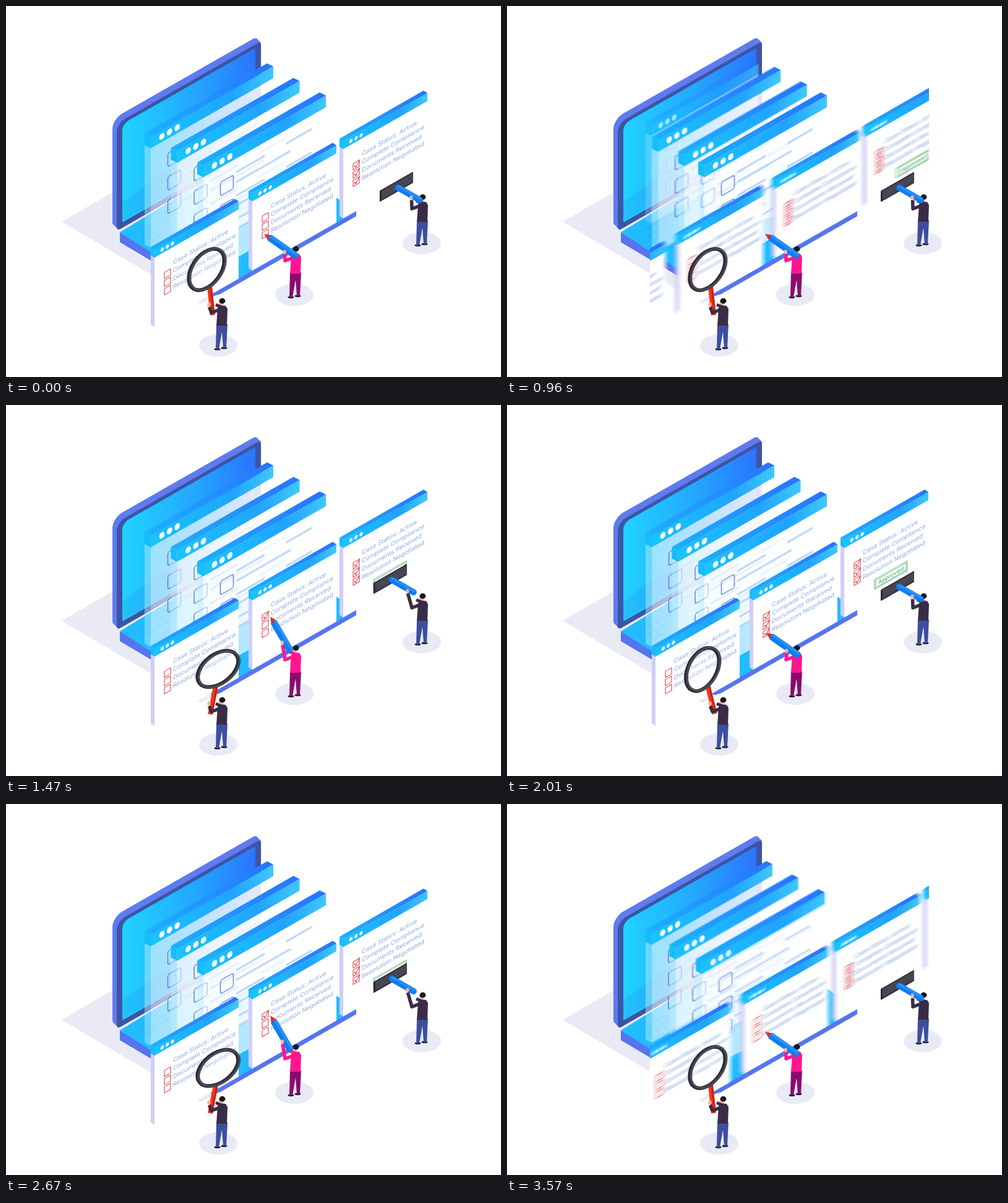
An HTML page with a canvas for the animation above (3600 ms loop, 800x600 px).

```html
<!DOCTYPE html>
<html lang="en">
<head>
<meta charset="utf-8">
<style>
html, body { margin: 0; width: 100%; height: 100%; overflow: hidden; background: #fff; }
canvas { display: block; }
</style>
</head>
<body>
<canvas id="stage" width="800" height="600"></canvas>
<script>
const stage = document.getElementById('stage').getContext('2d');
const buffer = document.createElement('canvas');
buffer.width = 800; buffer.height = 600;
const c = buffer.getContext('2d');

const CYCLE = 1200, SLIDE_START = 885, SLOPE = 0.572;
const clamp = (v, top = 1) => Math.max(0, Math.min(top, v));
const smooth = u => { u = clamp(u); return u * u * (3 - 2 * u); };
const rad = deg => deg * Math.PI / 180;

function poly(fill, ...p) {
  c.beginPath();
  for (let i = 0; i < p.length; i += 2) c.lineTo(p[i], p[i + 1]);
  c.closePath();
  c.fillStyle = fill;
  c.fill();
}
function line(color, width, ...p) {
  c.beginPath();
  for (let i = 0; i < p.length; i += 2) c.lineTo(p[i], p[i + 1]);
  c.strokeStyle = color;
  c.lineWidth = width;
  c.stroke();
}
function oval(fill, x, y, rx, ry = rx) {
  c.beginPath();
  c.ellipse(x, y, rx, ry, 0, 0, 7);
  c.fillStyle = fill;
  c.fill();
}
function roundBox(fill, x, y, w, h, r) {
  c.beginPath();
  c.roundRect(x, y, w, h, r);
  c.fillStyle = fill;
  c.fill();
}
function frame(color, width, x, y, w, h, r = 0) {
  c.beginPath();
  c.roundRect(x, y, w, h, r);
  c.strokeStyle = color;
  c.lineWidth = width;
  c.stroke();
}
function ramp(x0, y0, x1, y1, ...colors) {
  const g = c.createLinearGradient(x0, y0, x1, y1);
  colors.forEach((col, i) => g.addColorStop(i / (colors.length - 1), col));
  return g;
}
function group(draw) { c.save(); draw(); c.restore(); }
// Vertical plane rising to the right.
function plane(x, y, draw) {
  group(() => { c.transform(1, -SLOPE, 0, 1, x, y); draw(); });
}

// Standing sheet with a title bar; dx, dy is its depth.
function sheet(x, y, w, h, bar, dx, dy, side, face, content) {
  const rise = w * SLOPE;
  poly(side, x - dx, y - dy + bar, x, y + bar, x, y + h, x - dx, y - dy + h);
  plane(x, y, () => {
    c.fillStyle = face;
    c.fillRect(0, bar, w, h - bar);
    c.fillStyle = ramp(0, 0, w, 0, '#1bc4fd', '#1cb5ff', '#20a4ff', '#3fc8fa');
    c.fillRect(0, 0, w, bar);
    content();
  });
  poly('#17bdf8', x - dx, y - dy, x, y, x, y + bar, x - dx, y - dy + bar);
  poly(ramp(x, y, x + w, y - rise, '#1cb0ff', '#2291ff', '#2574ff'),
    x - dx, y - dy, x, y, x + w, y - rise, x + w - dx, y - rise - dy);
}

function appWindow(slot) {
  const face = ramp(0, 0, 198, 0, 'rgba(255,255,255,.55)', 'rgba(255,255,255,.9)');
  sheet(234 + 42.5 * slot, 211 + 23.5 * slot, 198, 180, 19, 10, 5, 'rgba(190,238,255,.45)', face, () => {
    for (let i = 0; i < 3; i++) {
      const top = 41 + i * 38;
      oval('#fff', 18 + 12.3 * i, 10, 4.3, 5);
      frame('rgba(86,116,222,.85)', 1.6, 27.5, top + 2, 21, 22, 3);
      const ink = 'rgba(176,207,247,.8)';
      line(ink, 3.6, 53, top, 99, top);
      line(ink, 3.6, 134, top, 175, top);
      line(ink, 3.6, 53, top + 16, 141, top + 16);
    }
  });
}

const LINES = ['Case Status: Active', 'Complete Compliance', 'Documents Received', 'Resolution Negotiated'];
function panel(slot, checks, stamped) {
  const dx = (slot - 2) * (slot < 2 ? 158 : 147);
  sheet(398 + dx, 303 - dx * 0.575, 136, 125, 13, 6, 4, '#cfcdf8', '#fff', () => {
    c.font = '9.7px Inter, sans-serif';
    c.fillStyle = '#8aaae2';
    LINES.forEach((s, i) => c.fillText(s, 30, 41.5 + i * 13.3));
    for (let i = 0; i < 3; i++) {
      const y = 51 + i * 13.3;
      oval('#fff', 12.5 + 8.2 * i, 7, 2.7, 3);
      frame('#e23c4b', 1.1, 16, y - 5, 10, 10);
      if (i < checks) line('#d8303f', 1.2, 18, y - 1, 20.5, y + 3, 27, y - 6);
    }
    if (stamped) {
      frame('#3fa55b', 0.8, 49, 92, 53, 16);
      frame('#3fa55b', 0.8, 51, 94, 49, 12);
      c.font = '9px Inter, sans-serif';
      c.fillStyle = '#3fa55b';
      c.textAlign = 'center';
      c.fillText('Approved', 75.5, 103.3);
    }
  });
}

function laptop() {
  poly('#e9eaf5', 90, 349, 200, 285, 350, 462, 315, 482);
  poly('#5675ee', 184, 366, 184, 382, 326, 466, 336, 469, 346, 466, 566, 340, 566, 332, 335, 458);
  poly('#21bcfe', 184, 366, 412, 226, 566, 332, 344, 459, 336, 461, 326, 458);
  group(() => {
    c.transform(0.867, -0.5, 0.85, 0.53, 206, 366);
    for (let i = 0; i < 28; i++) frame('rgba(30,110,220,.2)', 1, 8 + i % 7 * 14, 4 + (i >> 2 & 3) * 14, 12, 12);
  });
  for (let i = 0; i < 4; i++)
    plane(172 + i * 1.7, 183 + i * 1.7, () => roundBox('#5f7bee', 0, 0, 235, 175, [16, 8, 0, 8]));
  plane(179, 190, () => roundBox('#3d54a6', 0, 0, 233, 174, [14, 6, 0, 6]));
  plane(188, 191, () => roundBox(ramp(0, 0, 215, 0, '#20d2ff', '#23acff', '#2b74ff'), 0, 0, 215, 159, [10, 2, 0, 2]));
  poly('rgba(50,90,210,.13)', 188, 318, 300, 235, 300, 284, 188, 348);
}

function windows(f) {
  // A new window grows out of the screen, the front one dissolves.
  if (f > 0) group(() => {
    const s = 0.84 + 0.16 * f;
    c.globalAlpha = clamp(f * 2.5);
    c.translate(223 * (1 - s), 62 * (1 - s));
    c.scale(s, s);
    appWindow(0);
  });
  appWindow(f);
  appWindow(1 + f);
  c.globalAlpha = clamp((1 - f) / 0.7);
  appWindow(2);
  c.globalAlpha = 1;
}

// Going up to the first box, then one tick after another.
const TICK_START = 150, TICK_TIME = 230;
const ticks = t => clamp((t - TICK_START) / TICK_TIME, 3);

function panels(t, f) {
  group(() => {
    c.beginPath();
    c.rect(231, 0, 451, 600);
    c.clip();
    for (let i = 0; i < 4; i++) {
      const checks = i < 2 ? 0 : i > 2 ? 3 : Math.floor(ticks(t) + 0.6);
      panel(i + f, checks, i === 3 && t > 190);
    }
  });
}

// x, y is the foot point of the figure, hx, hy its hand.
function person(x, y, shade, shirt, pants, hx, hy, tool) {
  const skin = '#f3b49b', dark = '#1a1420';
  oval('#e8eaf6', x + shade, y + shade / 2, 31, 18);
  group(() => {
    c.translate(x, y);
    oval(dark, -1.5, 6, 5, 1.8);
    oval(dark, 9.5, 4, 5, 1.8);
    poly(pants, -3, -34, 15, -34, 13, 4, 8, 4, 6, -22, 1, 6, -4, 6);
    poly(shirt, -1, -61, 5, -65, 12, -64, 15, -59, 14, -32, -3, -32);
    oval(skin, 4.5, -69, 3.8, 5);
    oval(dark, 6.5, -72, 5, 4.4);
    line(shirt, 5, 5, -62, -4, -66);
  });
  group(tool);
  oval(skin, hx, hy, 2.7, 3.4);
  line(shirt, 5.5, x + 2, y - 58, x - 11, y - 53, hx + 0.5, hy + 4);
}

function magnifier(t) {
  const swing = t < 870 ? 18.7 * Math.sin(t / 870 * 2 * Math.PI) : 0;
  c.translate(331, 487);
  c.rotate(rad(swing));
  line('#f0371c', 8, -2, -33, 3, 13);
  line('#c9220d', 3, 0, -34, 5, 11);
  c.translate(-6, -61);
  c.rotate(rad(-54.7));
  oval('rgba(255,255,255,.2)', 0, 0, 37, 22);
  for (const [color, width, shift] of [['#2b2933', 6, -0.8], ['#4a4953', 3.5, 0.8]]) {
    c.beginPath();
    c.ellipse(shift, shift, 37.5, 23, 0, 0, 7);
    c.strokeStyle = color;
    c.lineWidth = width;
    c.stroke();
  }
}

function pencilPose(t) {
  const k = ticks(t), done = Math.floor(k), v = 2 * (k - done);
  const row = k > 0 ? Math.min(2, done + smooth(v - 1)) : 2 - 2 * smooth(t / TICK_START);
  const out = v < 1 ? smooth(v) : smooth(2 - v);
  const dip = v < 1 ? 4 * Math.sin(v * Math.PI) : 0;
  return { x: 418 + 10 * out, y: 343 + 13 * row + dip, turn: rad(60 - 12.5 * row) };
}
function pencil({ x, y, turn }) {
  c.translate(x, y);
  c.rotate(turn);
  poly('#e22a24', -1, 0, 10, -5, 10, 5);
  roundBox('#0f7df0', 9, -5.5, 56, 11, [1, 4, 4, 1]);
  roundBox('#2490fb', 9, -5.5, 54, 5, 1);
}

function stamper(dx, dy) {
  c.translate(dx, dy);
  plane(604, 299, () => {
    roundBox('#2a2832', 0, 0, 54, 18, 1);
    roundBox('#484652', 3, 2, 51, 14, 1);
  });
  c.lineCap = 'round';
  line('#0f7df0', 10, 634, 294, 669, 314);
  line('#2490fb', 4, 635, 292, 670, 312);
}

function people(t) {
  const suit = '#3a2c47', jeans = '#3d4e9e';
  person(343, 549, 0, suit, jeans, 328, 483, () => magnifier(t));

  const pose = pencilPose(t);
  person(462, 465, 4, '#ff168f', '#8c0a70', pose.x + 43 * Math.cos(pose.turn) - 3,
    pose.y + 43 * Math.sin(pose.turn) + 4, () => pencil(pose));

  const push = t < 380 ? 1.3 * Math.sin(t / 380 * Math.PI) : 0;
  person(667, 381, 5, suit, jeans, 655 - 6 * push, 310 - 9 * push, () => stamper(-10 * push, -11 * push));
}

function scene(t) {
  const f = clamp((t - SLIDE_START) / (CYCLE - SLIDE_START));
  c.fillStyle = '#fff';
  c.fillRect(0, 0, 800, 600);
  c.lineJoin = 'round';
  laptop();
  windows(f);
  panels(t, f);
  people(t);
}

// While the sheets slide, several moments are averaged as motion blur.
function render(now) {
  const t = now % CYCLE, shutter = 18;
  const samples = t > SLIDE_START - shutter / 2 ? 8 : 1;
  for (let i = 0; i < samples; i++) {
    scene(samples > 1 ? Math.min(CYCLE, t + (i / (samples - 1) - 0.5) * shutter) : t);
    stage.globalAlpha = 1 / (i + 1);
    stage.drawImage(buffer, 0, 0);
  }
}

const start = performance.now();
function tick() {
  render(performance.now() - start);
  requestAnimationFrame(tick);
}
tick();
</script>
</body>
</html>
```
